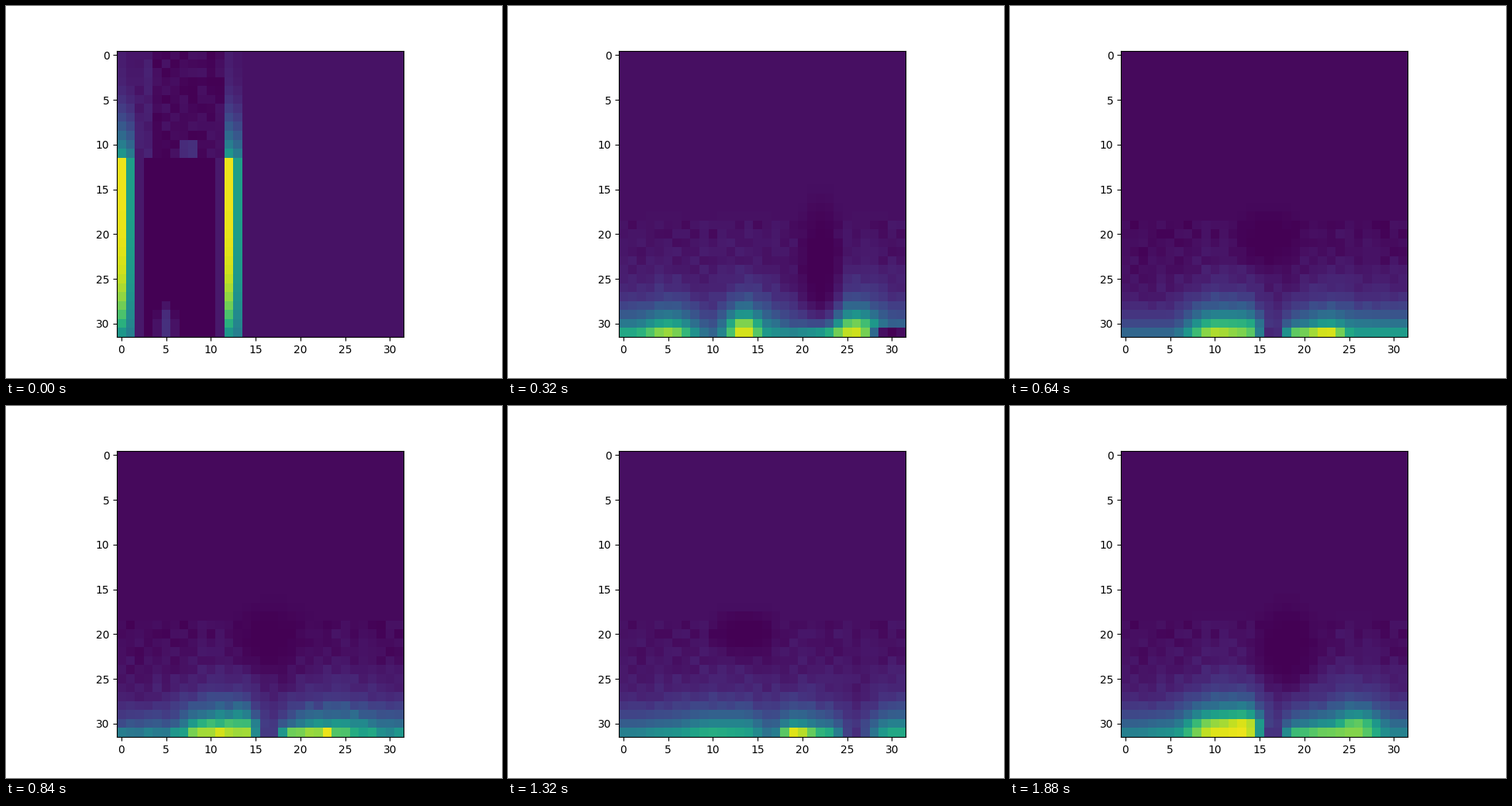
A matplotlib script that plays this animation: 640x480 px, repeating every 1960 ms.

```python
import numpy as np
import matplotlib.pyplot as plt
from matplotlib.animation import FuncAnimation

N = 32
FRAMES = 49
idx = np.arange(N)
rows, cols = np.mgrid[0:N, 0:N]
grain = np.random.default_rng(12).uniform(-1, 1, (N, N))

# Columns of the hills and dips, and how tall each hill grows.
SPOTS = np.array([1, 5, 10, 13.5, 16.5, 19, 22.7, 25.7, 30])
TALL = np.array([.8, .8, .9, 1, 1, .55, .65, 1, .9])


def eased(x, xs, ys):
    """Interpolate between key points with a smooth start and stop."""
    k = np.clip(np.searchsorted(xs, x, side="right") - 1, 0, len(xs) - 2)
    t = np.clip((x - xs[k]) / (xs[k + 1] - xs[k]), 0, 1)
    return ys[k] + (ys[k + 1] - ys[k]) * t * t * (3 - 2 * t)


def blob(c, r, w, h):
    return np.exp(-(((cols - c) / w) ** 2 + ((rows - r) / h) ** 2) ** 2)


def field(bg, gain, heights, *shades):
    """A bright floor whose hills soften and fade upwards."""
    heights = np.array(heights)
    a = np.full((N, N), bg)
    a[31] = eased(idx, SPOTS, heights)
    level = 0.08 + eased(idx, SPOTS, gain * TALL * heights ** 1.5)
    for r in range(30, 17, -1):
        a[r] = bg + level * min(1, (r - 17) / 3)
        pad = np.pad(level, 1, mode="edge")
        level = 0.66 * np.convolve(pad, [.2, .6, .2], mode="valid")
    a += 0.022 * grain * ((rows > 18) & (rows < 29))
    for shade in shades:
        a *= 1 - blob(*shade)
    return np.clip(a, 0, 1)


def bars():
    a = np.full((N, N), 0.05)
    upper = rows < 12
    a[:, :14] = np.where(upper, 0.025 + 0.025 * grain, 0)[:, :14]
    a[:, 2:4] += 0.05 * upper[:, 2:4]
    a[:, [2, 11]] += 0.07 * ~upper[:, [2, 11]]
    a += 0.14 * (blob(7.5, 10.5, 1, 1) + blob(5, 30.5, 1, 2.5))
    rise = (idx / 11) ** 2.5
    drop = np.clip((idx - 12) / 19, 0, 1)
    for c in (0, 12):
        a[:, c] = np.where(idx < 12, .08 + .44 * rise, .97 - .44 * drop ** 5)
        a[:, c + 1] = np.where(idx < 12, .06 + .35 * rise, .56 - .13 * drop ** 4)
    return np.clip(a, 0, 1)


start = bars()
rough = field(.042, .75, [.6, .85, .32, .97, .5, .45, .75, .93, .45],
              (22, 23.5, 2.6, 7), (30, 31.3, 2.3, 1))
split = field(.025, .75, [.33, .33, .88, .8, .05, .75, .95, .54, .55],
              (16, 20.5, 4, 3))
twin = field(.025, .7, [.45, .55, .92, .97, .18, .78, .85, .78, .42],
             (17, 20.5, 4.2, 4))
calm = field(.04, .75, [.43, .5, .62, .58, .36, .95, .62, .12, .6],
             (13.5, 20, 4, 2.5))
broad = field(.04, .75, [.47, .62, .87, .97, .38, .75, .88, .72, .53],
              (19.5, 21, 3.4, 4.6))
settled = field(.03, .88, [.43, .5, .95, .97, .08, .68, .78, .82, .44],
                (18, 21.5, 3.8, 4.6))

times = [1, 8, 16, 26, 33, 39, 47]
poses = [.6 * rough + .4 * split, rough, split, twin, calm, broad, settled]


def state(n):
    if n == 0:
        return start
    n = min(n, times[-1])
    k = min(np.searchsorted(times, n, side="right") - 1, len(times) - 2)
    t = (n - times[k]) / (times[k + 1] - times[k])
    a = (1 - t) * poses[k] + t * poses[k + 1]
    # Small flicker that dies down as the picture settles.
    noise = np.random.default_rng(n).uniform(-1, 1, (N, N))
    size = .16 * np.sin(np.pi * t) * (1 - n / 55)
    return np.clip(a + size * noise * a * (rows > 18), 0, 1)


fig, ax = plt.subplots(figsize=(6.4, 4.8), dpi=100)
image = ax.imshow(start, cmap="viridis", vmin=0, vmax=1)


def update(n):
    image.set_data(state(n))
    return [image]


anim = FuncAnimation(fig, update, frames=FRAMES, interval=40, repeat=True,
                     repeat_delay=0)
plt.show()
```
